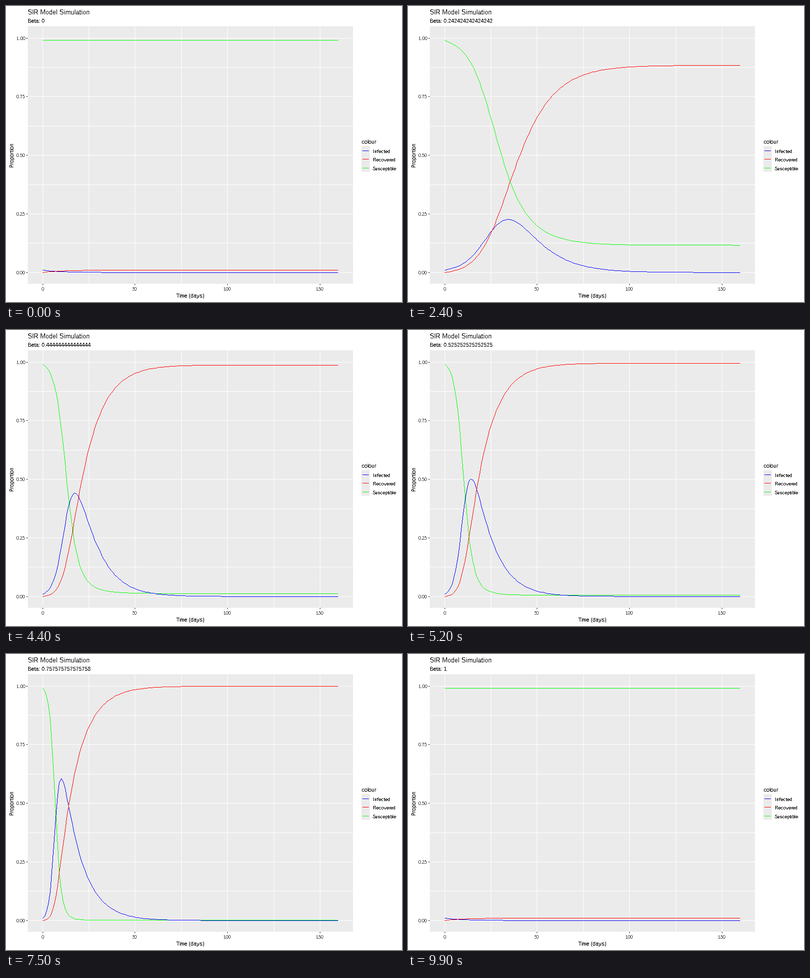
Animation of 800 by 600 pixels, one loop 10 s. Source, as a matplotlib script:

```python
import matplotlib.pyplot as plt
import numpy as np
from matplotlib.animation import FuncAnimation
from matplotlib.patches import Rectangle

plt.rcParams.update({
    "font.family": "Liberation Sans",
    "text.antialiased": False,
    "text.hinting": "default",
    "text.hinting_factor": 1,
    "text.kerning_factor": 6,
    "path.simplify": False,
})

W, H, DPI = 800, 600, 100
FRAMES, INTERVAL = 100, 100
DAYS, GAMMA = 160, 0.1
PANEL = "#ebebeb"
BLUE, RED, GREEN = "#0000ff", "#ff0000", "#00ff00"

fig = plt.figure(figsize=(W / DPI, H / DPI), dpi=DPI, facecolor="white")
ax = fig.add_axes([0, 0, 1, 1])
ax.set_xlim(0, W)
ax.set_ylim(H, 0)
ax.axis("off")


def px(n):
    return n * 72 / DPI


def pixel(v):
    return np.floor(np.asarray(v) + 0.5).astype(int)


def x_pos(day):
    return pixel(73.82 + 3.7335 * day)


def y_pos(share):
    return pixel(539.7 - 475 * share)


def box(x, y, w, h, color):
    patch = Rectangle((x, y), w, h, facecolor=color, edgecolor="none",
                      linewidth=0, antialiased=False)
    ax.add_patch(patch)


def label(x, y, s, size, color="black", **kw):
    return ax.text(x, y, s, fontsize=px(size), color=color,
                   va="baseline", **kw)


def curve(color):
    line, = ax.plot([], [], color=color, lw=px(0.3), antialiased=False,
                    solid_capstyle="butt")
    line.set_snap(False)
    return line


def trace(x, y):
    """Aliased one-pixel polyline: a short dash inside every pixel crossed."""
    dx, dy = np.diff(x), np.diff(y)
    steps = np.maximum(abs(dx), abs(dy))
    seg = np.repeat(np.arange(len(steps)), steps)
    first = np.cumsum(steps) - steps
    f = (np.arange(len(seg)) - first[seg]) / steps[seg]
    col = pixel(x[seg] + f * dx[seg])
    row = pixel(y[seg] + f * dy[seg])
    dashes = np.column_stack([col + 0.2, col + 0.8, np.full(len(col), np.nan)])
    return dashes.ravel(), np.repeat(row + 0.5, 3)


def simulate(beta, substeps=8):
    """Daily S, I, R for every beta at once, by RK4."""
    def slope(y):
        s, i, _ = y
        new, healed = beta * s * i, GAMMA * i
        return np.array([-new, new - healed, healed])

    y = np.array([np.full_like(beta, v) for v in (0.99, 0.01, 0.0)])
    out, h = [y], 1 / substeps
    for _ in range(DAYS):
        for _ in range(substeps):
            a = slope(y)
            b = slope(y + h / 2 * a)
            c = slope(y + h / 2 * b)
            d = slope(y + h * c)
            y = y + h / 6 * (a + 2 * b + 2 * c + d)
        out.append(y)
    return np.array(out)


# Panel, grid and axes
box(44, 41, 657, 522, PANEL)
for k in range(9):
    y = y_pos(k / 8)
    box(44, y, 657, 1, "white")
    if k % 2 == 0:
        box(41, y, 3, 1, "#333333")
        label(39, y + 4, f"{k / 8:.2f}", 9, "#4d4d4d", ha="right")
for day in range(0, 151, 25):
    x = x_pos(day)
    box(x, 41, 1, 522, "white")
    if day % 50 == 0:
        box(x, 563, 1, 3, "#333333")
        label(x, 577, str(day), 9, "#4d4d4d", ha="center")

label(44, 17, "SIR Model Simulation", 13)
subtitle = label(44, 34, "", 11)
label(372.5, 591, "Time (days)", 11, ha="center")
label(15, 302, "Proportion", 11, ha="center", rotation=90,
      rotation_mode="anchor")

# Legend
label(718, 279, "colour", 11)
box(718, 284, 17, 52, PANEL)
for name, color, y in (("Infected", BLUE, 293), ("Recovered", RED, 310),
                       ("Susceptible", GREEN, 328)):
    box(720, y, 13, 1, color)
    label(741, y + 5, name, 9)

betas = np.arange(FRAMES) / (FRAMES - 1)
shares = simulate(betas)
xs = x_pos(np.arange(DAYS + 1))
curves = [curve(c) for c in (GREEN, BLUE, RED)]


def update(n):
    # The curves run slightly ahead of the label and wrap round at the end.
    state = int(n * FRAMES / (FRAMES - 1) + 0.5) % FRAMES
    for line, ys in zip(curves, y_pos(shares[:, :, state]).T):
        line.set_data(*trace(xs, ys))
    subtitle.set_text(f"Beta: {betas[n]:.15g}")
    return *curves, subtitle


anim = FuncAnimation(fig, update, frames=FRAMES, interval=INTERVAL,
                     repeat=True, repeat_delay=0, blit=False)
plt.show()
```
